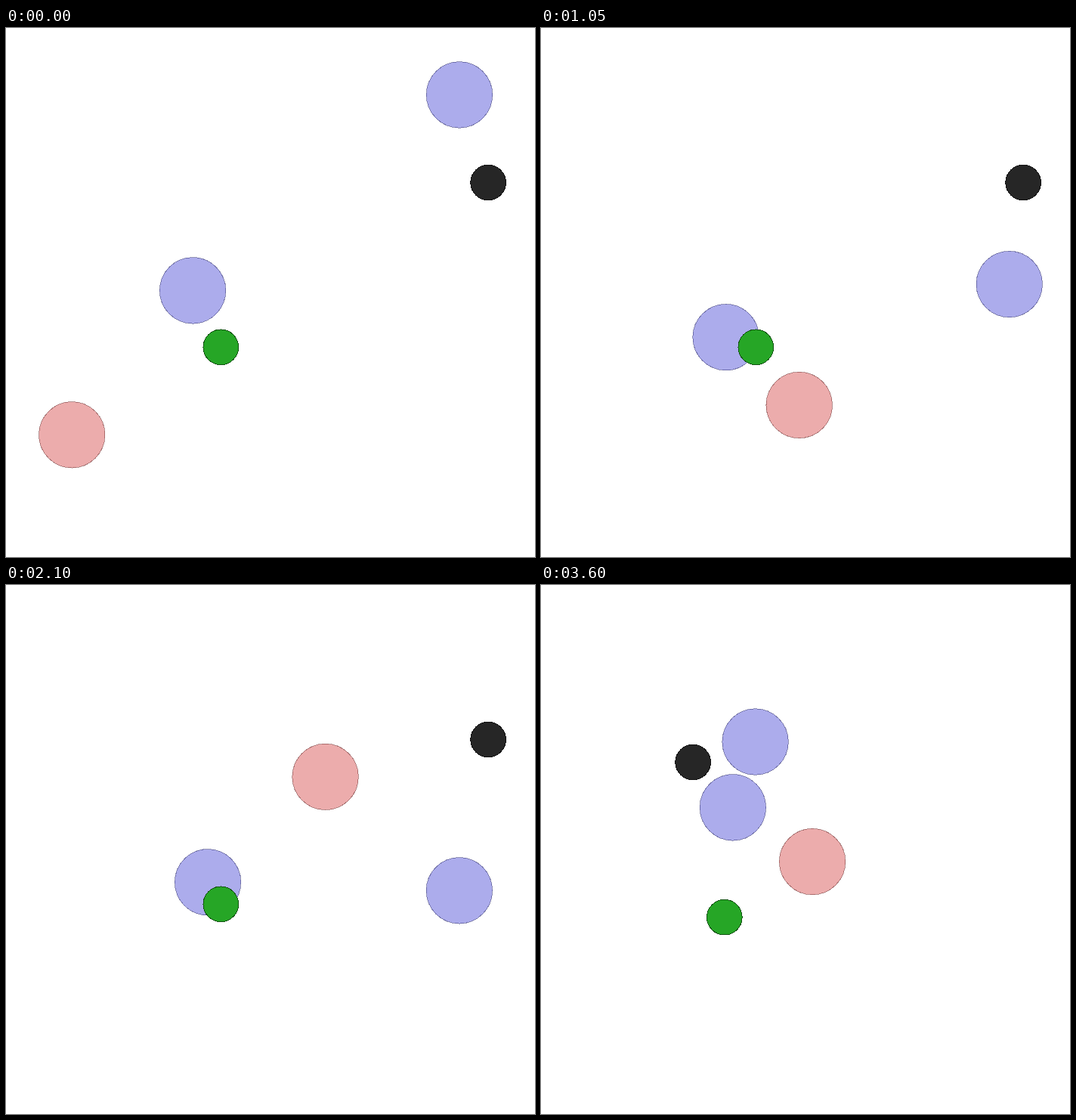
These frames come from a looping animation (700x700 px, 3750 ms). An HTML page without scripts:

```html
<!DOCTYPE html>
<html lang="en">
<head>
<meta charset="utf-8">
<title>Agents and landmarks</title>
<style>
  @property --k { syntax: "<number>"; inherits: true; initial-value: 0; }

  html, body { margin: 0; width: 100%; height: 100%; overflow: hidden; background: #fff; }
  svg { display: block; width: 100%; height: 100%; animation: tick 3.75s steps(25) infinite; }
  @keyframes tick { from { --k: 0; } to { --k: 25; } }

  circle { shape-rendering: crispEdges; }
  .agent { r: 43.75px; }
  .mark { r: 23.33px; }
  .red { fill: #ecacac; stroke: rgb(108 45 45 / .5); }
  .blue { fill: #acacec; stroke: rgb(45 45 108 / .5); }
  .green { fill: #26a626; stroke: #135313; }
  .black { fill: #262626; stroke: #131313; }

  /* thrust (x, y) from step s to step e; speed keeps 75% per step */
  .push {
    --n: max(0, var(--k) - var(--s));
    --m: max(0, var(--k) - var(--e));
    --d: calc(4px * (var(--n) - var(--m) + 3 * (pow(.75, var(--n)) - pow(.75, var(--m)))));
    transform: translate(calc(var(--x) * var(--d)), calc(var(--y) * var(--d)));
  }

  /* the last step shows a fresh start */
  .run { animation: leave 3.75s step-end infinite; }
  .fresh { visibility: hidden; animation: enter 3.75s step-end infinite; }
  @keyframes leave { 0% { visibility: visible; } 96%, 100% { visibility: hidden; } }
  @keyframes enter { 0% { visibility: hidden; } 96%, 100% { visibility: visible; } }
</style>
</head>
<body>
<svg viewBox="0 0 700 700">
  <g class="run">
    <g class="push" style="--s:-1; --e:5; --x:14.58; --y:0">
    <g class="push" style="--s:5; --e:8; --x:0; --y:-14.3">
    <g class="push" style="--s:8; --e:12; --x:3; --y:-11.2">
    <g class="push" style="--s:12; --e:14; --x:-8.5; --y:-1.1">
    <g class="push" style="--s:14; --e:16; --x:-.6; --y:12.4">
    <g class="push" style="--s:17; --e:18; --x:13.6; --y:0">
    <g class="push" style="--s:18; --e:19; --x:0; --y:13">
      <circle class="agent red" cx="72.7" cy="538.3"/>
    </g></g></g></g></g></g></g>

    <g class="push" style="--s:-1; --e:2; --x:1.8; --y:10.3">
    <g class="push" style="--s:2; --e:6; --x:.6; --y:14.4">
    <g class="push" style="--s:6; --e:8; --x:-3; --y:12.5">
    <g class="push" style="--s:8; --e:11; --x:-1; --y:-9.9">
    <g class="push" style="--s:11; --e:13; --x:.4; --y:-3">
    <g class="push" style="--s:14; --e:15; --x:-9; --y:3.6">
    <g class="push" style="--s:15; --e:17; --x:.7; --y:9">
    <g class="push" style="--s:17; --e:19; --x:2.5; --y:.5">
    <g class="push" style="--s:19; --e:21; --x:-1; --y:-11.5">
    <g class="push" style="--s:21; --e:22; --x:1.5; --y:8">
      <circle class="agent blue" cx="598.2" cy="78.1"/>
    </g></g></g></g></g></g></g></g></g></g>

    <g class="push" style="--s:-1; --e:5; --x:-.81; --y:4.26">
    <g class="push" style="--s:5; --e:6; --x:7.8; --y:-4">
    <g class="push" style="--s:6; --e:8; --x:-2; --y:-5.5">
    <g class="push" style="--s:8; --e:10; --x:13.3; --y:-2.5">
    <g class="push" style="--s:10; --e:12; --x:-11; --y:2.6">
    <g class="push" style="--s:12; --e:13; --x:-6; --y:6">
    <g class="push" style="--s:13; --e:17; --x:5; --y:-3">
    <g class="push" style="--s:17; --e:18; --x:-9.5; --y:4.5">
    <g class="push" style="--s:19; --e:20; --x:-13; --y:1.5">
    <g class="push" style="--s:20; --e:21; --x:4.5; --y:9.5">
    <g class="push" style="--s:21; --e:22; --x:-7.3; --y:0">
      <circle class="agent blue" cx="247.9" cy="343.1"/>
    </g></g></g></g></g></g></g></g></g></g></g>

    <circle class="mark green" cx="284.3" cy="422.3"/>
    <circle class="mark black" cx="638.1" cy="204.5"/>
  </g>

  <g class="fresh">
    <circle class="agent red" cx="359.1" cy="366.1"/>
    <circle class="agent blue" cx="283.6" cy="207.5"/>
    <circle class="agent blue" cx="253.9" cy="294.4"/>
    <circle class="mark green" cx="242.8" cy="439.7"/>
    <circle class="mark black" cx="201.1" cy="234.5"/>
  </g>
</svg>
</body>
</html>
```
